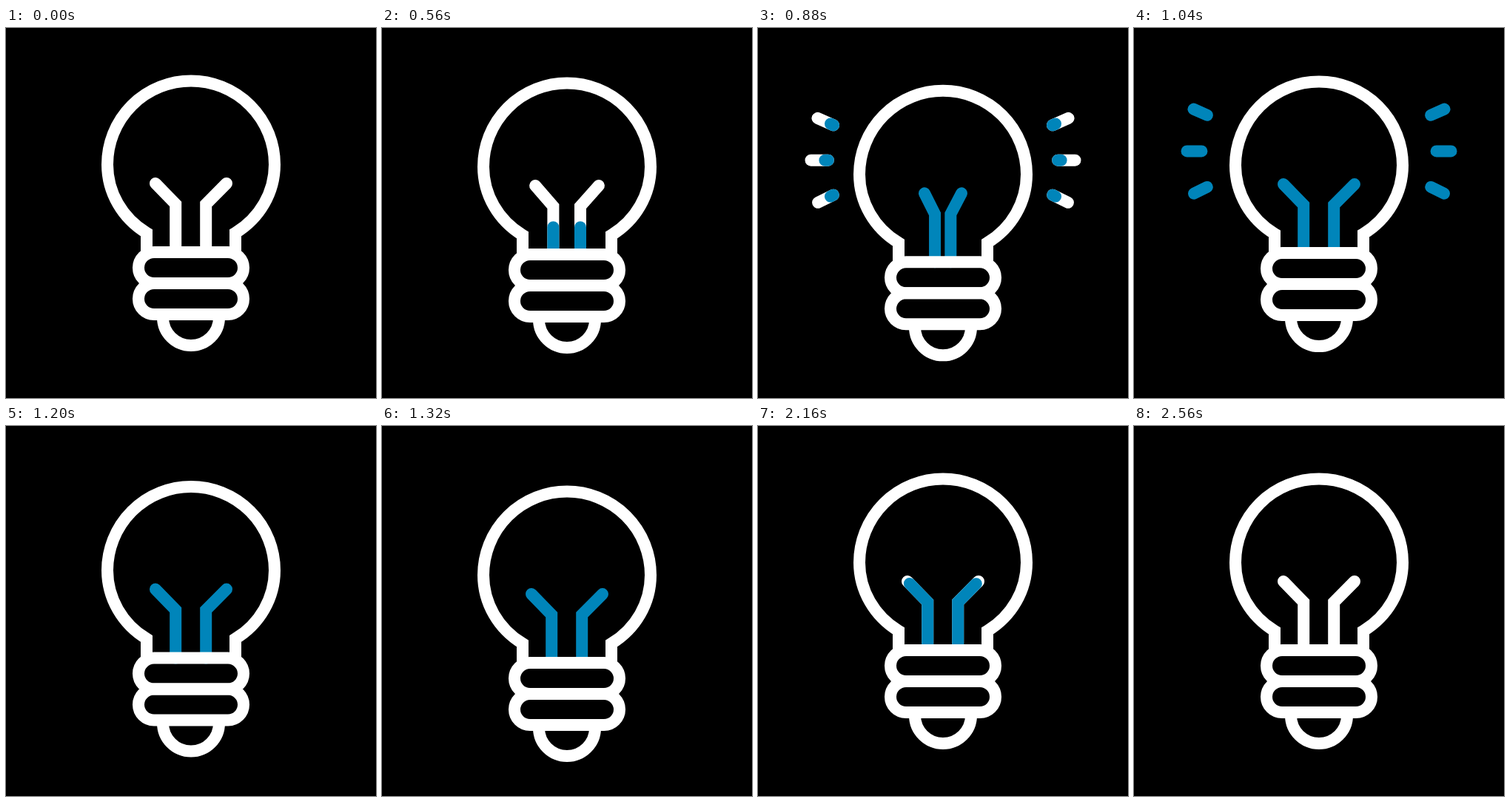
Recreate the animation shown at these times as an HTML page with a canvas. Size 500 px wide and 500 px high, loop 3 s.

```html
<!DOCTYPE html>
<html lang="en">
<head>
<meta charset="utf-8">
<title>Light bulb</title>
<style>
html, body { margin: 0; width: 100%; height: 100%; overflow: hidden; background: #000; }
canvas { display: block; width: 100vmin; height: 100vmin; }
</style>
</head>
<body>
<canvas id="stage" width="500" height="500"></canvas>
<script>
const ctx = document.getElementById('stage').getContext('2d');
const LOOP = 3000, STEP = 40, DEPTH = 17.6;
const WHITE = '#fff', BLUE = '#0085ba';

const progress = (t, a, b) => Math.min(1, Math.max(0, (t - a) / (b - a)));
const sine = p => (1 - Math.cos(Math.PI * p)) / 2;
const quart = p => p < 0.5 ? 8 * p ** 4 : 1 - 8 * (1 - p) ** 4;
const ease = (t, a, b) => sine(progress(t, a, b));
const mix = (a, b, p) => a + (b - a) * p;

// Left-hand rays: inner end, then outer end
const RAYS = [
  [102, 118, 80.5, 108.5],
  [94.8, 165.3, 71.5, 165.3],
  [101.8, 212.3, 81, 222.5]
];

// How far the bulb sits below its resting height
function drop(t) {
  if (t < 820) return DEPTH * quart(progress(t, 400, 820));
  if (t < 1000) return mix(DEPTH, 0.6, ease(t, 820, 1000));
  if (t < 1360) return mix(0.6, DEPTH, ease(t, 1000, 1360));
  return mix(DEPTH, 0, ease(t, 1360, 1560));
}

function line(points, color) {
  ctx.strokeStyle = color;
  ctx.beginPath();
  points.forEach(([x, y]) => ctx.lineTo(x, y));
  ctx.stroke();
}

function drawBulb() {
  ctx.strokeStyle = WHITE;
  ctx.lineCap = 'butt';
  const turn = Math.acos(60 / 113);
  ctx.beginPath();
  ctx.moveTo(190, 303);
  // The lower half is slightly flatter than a circle
  ctx.ellipse(250, 184.5, 113, 109, 0, Math.PI - turn, Math.PI);
  ctx.arc(250, 184.5, 113, Math.PI, 0);
  ctx.ellipse(250, 184.5, 113, 109, 0, 0, turn);
  ctx.lineTo(310, 303);
  ctx.stroke();
  for (const y of [303, 345]) {
    ctx.beginPath();
    ctx.roundRect(179, y, 142, 42, 21);
    ctx.stroke();
  }
  ctx.beginPath();
  ctx.arc(250, 391, 38, 0, Math.PI);
  ctx.stroke();
}

function drawFilament(squeeze, fill) {
  const stem = 20.5 - 13.3 * squeeze;
  const tip = 48 - 31 * squeeze;
  const length = 65 + Math.hypot(tip - stem, 28);
  for (const side of [-1, 1]) {
    const points = [
      [249.7 + side * stem, 303],
      [249.7 + side * stem, 238],
      [250 + side * tip, 210]
    ];
    if (fill < 1) line(points, WHITE);
    if (fill > 0) {
      if (fill < 1) ctx.setLineDash([length * fill, 999]);
      line(points, BLUE);
      ctx.setLineDash([]);
    }
  }
}

function drawRay([x0, y0, x1, y1], from, to, color) {
  if (to <= from) return;
  const at = p => [mix(x0, x1, p), mix(y0, y1, p)];
  const a = at(from), b = at(to);
  line([a, b], color);
  line([[500 - a[0], a[1]], [500 - b[0], b[1]]], color);
}

function drawRays(t) {
  const white = ease(t, 720, 880);
  const blue = ease(t, 832, 1000);
  const out = ease(t, 1000, 1160);
  for (const ray of RAYS) {
    if (blue < 1) drawRay(ray, 0, white, WHITE);
    drawRay(ray, out, blue, BLUE);
  }
}

function draw(t) {
  ctx.setTransform(1, 0, 0, 1, 0, 0);
  ctx.fillStyle = '#000';
  ctx.fillRect(0, 0, 500, 500);
  const y = drop(t);
  ctx.translate(0, y);
  ctx.lineWidth = 16;
  ctx.lineCap = 'round';
  ctx.lineJoin = 'miter';
  const fill = ease(t, 380, 820) - ease(t, 2100, 2560);
  drawFilament(t < 1000 ? y / 18 : 0, fill);
  drawRays(t);
  drawBulb();
}

const start = performance.now();
function tick() {
  const t = (performance.now() - start) % LOOP;
  draw(Math.floor(t / STEP) * STEP);
  requestAnimationFrame(tick);
}
tick();
</script>
</body>
</html>
```
